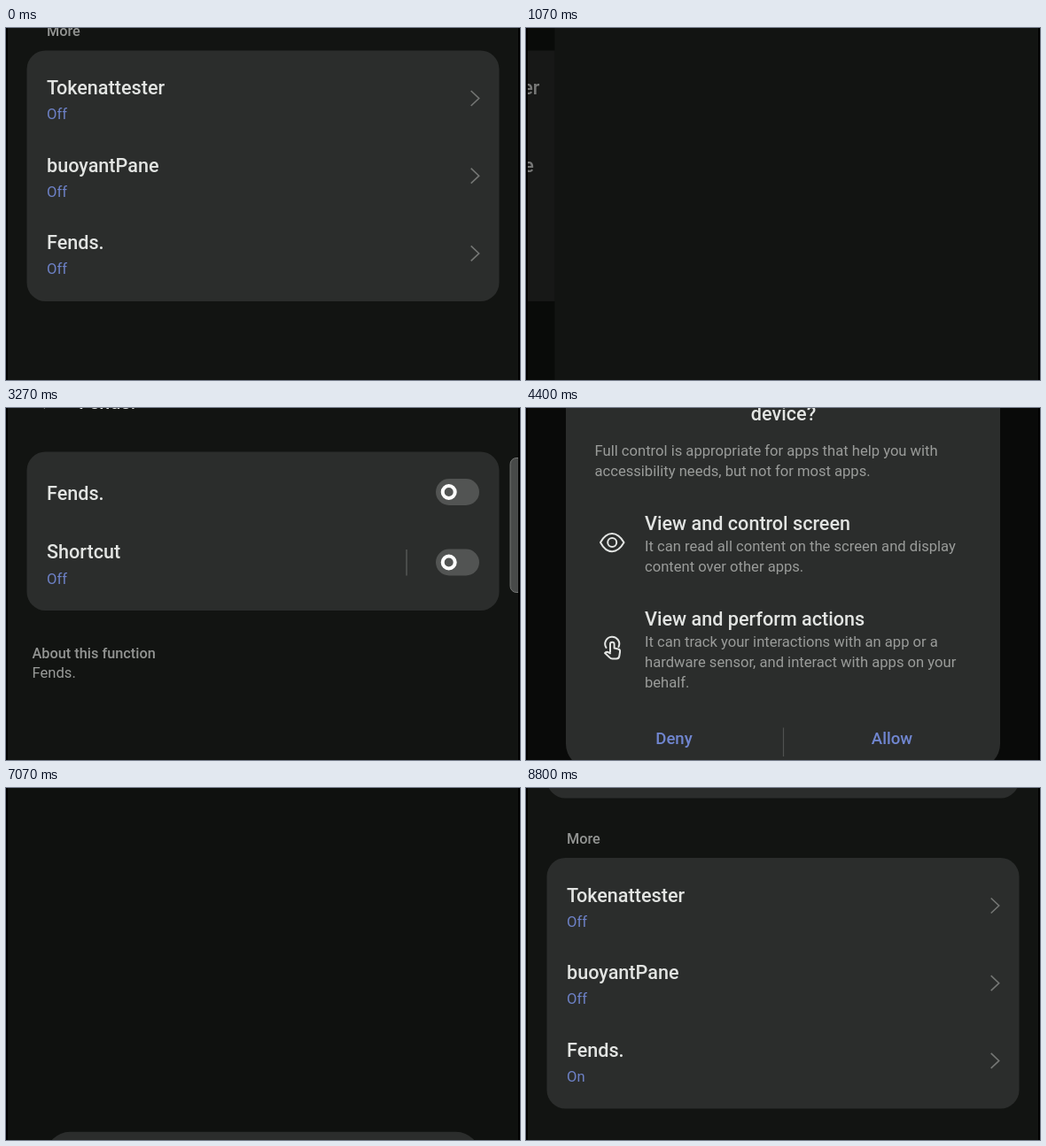
An HTML page for the animation above (8.87 s loop, 580x398 px).

```html
<!DOCTYPE html>
<html lang="en">
<head>
<meta charset="utf-8">
<title>Accessibility settings</title>
<style>
  html, body { margin: 0; width: 100%; height: 100%; overflow: hidden; background: #000; }
  svg { display: block; width: 100%; height: 100%; }
  text { font-family: Roboto, sans-serif; font-size: 16.6px; fill: #9a9c9a; }
  .title { font-size: 21.6px; font-weight: 500; fill: #e2e4e2; }
  .small { font-size: 16.3px; font-weight: 500; fill: #929492; }
  .state { fill: #6d81c6; }
  .button { font-size: 18.6px; font-weight: 500; fill: #7086d0; }
  .middle { text-anchor: middle; }
  .card { fill: #2b2d2c; }
  .ground { fill: #121412; }
  .icon { fill: none; stroke: #e2e4e2; stroke-width: 2; stroke-linecap: round; stroke-linejoin: round; }
</style>
</head>
<body>
<svg viewBox="0 0 580 398">
  <defs>
    <clipPath id="screen"><rect x="2" width="576" height="398"/></clipPath>
    <clipPath id="cardShape"><rect x="23.5" y="49.5" width="533" height="179.5" rx="21"/></clipPath>
    <path id="chevron" d="M524.7 71 L533.7 79.5 L524.7 88" fill="none" stroke="#747674" stroke-width="1.6"/>
    <g id="toggle">
      <rect x="485" y="-15" width="49" height="30" rx="15" fill="#525453"/>
      <circle cx="499.7" r="7" fill="none" stroke="#fff" stroke-width="4"/>
    </g>
  </defs>
  <rect width="580" height="398"/>
  <g clip-path="url(#screen)">
    <g id="list">
      <rect class="ground" width="780" height="398"/>
      <g id="scroller">
        <rect class="card" x="23.5" y="-142" width="533" height="100" rx="21"/>
        <text class="small" x="46" y="9">More</text>
        <rect class="card" x="23.5" y="25.5" width="533" height="283.5" rx="21"/>
        <text class="title" x="46" y="75">Tokenattester</text>
        <text class="state" x="46" y="103">Off</text>
        <use href="#chevron"/>
        <text class="title" x="46" y="162.7">buoyantPane</text>
        <text class="state" x="46" y="190.7">Off</text>
        <use href="#chevron" y="87.7"/>
        <text class="title" x="46" y="250.4">Fends.</text>
        <text class="state" id="status" x="46" y="278.4">Off</text>
        <use href="#chevron" y="175.4"/>
      </g>
    </g>
    <rect id="listShade" width="580" height="398"/>

    <g id="page">
      <rect class="ground" x="2" width="576" height="398"/>
      <g id="content">
        <path d="M44 -18 L35 -9 L44 0" fill="none" stroke="#e2e4e2" stroke-width="2"/>
        <text class="title" x="82" y="1">Fends.</text>
        <g clip-path="url(#cardShape)">
          <rect class="card" x="23" y="49" width="534" height="181"/>
          <rect id="press" x="23" y="49" width="534" height="82" fill="#353736"/>
        </g>
        <text class="title" x="46" y="103.5">Fends.</text>
        <use href="#toggle" y="95"/>
        <text class="title" x="46" y="170">Shortcut</text>
        <text class="state" x="46" y="198.5">Off</text>
        <path d="M452 160 V189.5" stroke="#555755" stroke-width="1.5"/>
        <use href="#toggle" y="174.5"/>
        <text class="small" x="29.5" y="283">About this function</text>
        <text x="29.5" y="305">Fends.</text>
        <rect x="569" y="56.5" width="24" height="152" rx="7" fill="#484a49" stroke="#747674"/>
      </g>
      <rect id="shade" x="2" width="576" height="398"/>
      <g id="dialog">
        <rect class="card" x="45" y="-80" width="490" height="487" rx="27"/>
        <text class="title middle" x="290.5" y="13.5">device?</text>
        <text x="77.5" y="54">Full control is appropriate for apps that help you with</text>
        <text x="77.5" y="77">accessibility needs, but not for most apps.</text>
        <g class="icon">
          <path d="M84 152 C91 138.5 103 138.5 110.5 152 C103 165.5 91 165.5 84 152 Z"/>
          <circle cx="97.2" cy="152" r="5"/>
          <path d="M90.5 271 A8 8 0 1 1 104.5 270"/>
          <path d="M95 276 V267 A2.3 2.3 0 0 1 99.600 267 V271.500 L104 272.500 Q106.500 273 106 276 L105.300 280.500 Q104.800 283.500 102 283.500 H97.500 Q95.500 283.500 94.300 282 L89 277 Q91 274.500 95 277.500"/>
        </g>
        <text class="title" x="134" y="138">View and control screen</text>
        <text x="134" y="162">It can read all content on the screen and display</text>
        <text x="134" y="185">content over other apps.</text>
        <text class="title" x="134" y="246">View and perform actions</text>
        <text x="134" y="270">It can track your interactions with an app or a</text>
        <text x="134" y="293">hardware sensor, and interact with apps on your</text>
        <text x="134" y="316">behalf.</text>
        <text class="button middle" x="167" y="380">Deny</text>
        <path d="M290.5 361.5 V394" stroke="#505250" stroke-width="1.2"/>
        <text class="button middle" x="413" y="380">Allow</text>
      </g>
    </g>
  </g>
</svg>
<script>
  const LOOP = 8870, TICK = LOOP / 133, WIDTH = 576;
  const el = id => document.getElementById(id);
  const [list, scroller, status, listShade, page, content, press, shade, dialog] =
    ['list', 'scroller', 'status', 'listShade', 'page', 'content', 'press', 'shade', 'dialog'].map(el);

  const ramp = (t, from, to) => Math.min(1, Math.max(0, (t - from) / (to - from)));
  const easeInOut = p => (1 - Math.cos(Math.PI * p)) / 2;
  const easeOut = p => 1 - (1 - p) ** 3;
  const move = (node, x, y) => node.setAttribute('transform', `translate(${x.toFixed(2)} ${y.toFixed(2)})`);
  const fade = (node, opacity) => {
    node.style.opacity = opacity;
    node.style.display = opacity > 0 ? '' : 'none';
  };

  function render(t) {
    // The opened page covers the list, which trails it at a slower rate.
    const cover = easeInOut(ramp(t, 645, 1140)) - easeInOut(ramp(t, 7850, 8270));
    move(page, WIDTH * (1 - cover), 0);
    move(list, -0.3 * WIDTH * cover, 0);
    fade(listShade, 0.5 * cover);
    move(scroller, 0, 53.5 * easeOut(ramp(t, 8250, 8735)));
    status.textContent = t > 4000 ? 'On' : 'Off';

    fade(content, t < 1130 ? 0 : 1 - ramp(t, 3540, 3740));
    fade(press, t < 2730 ? 0 : 1 - ramp(t, 2740, 3268));

    const leave = ramp(t, 6936, 7136);
    fade(shade, 0.5 * (ramp(t, 3560, 3800) - leave));
    move(dialog, 0, 490 * (1 - easeOut(ramp(t, 3600, 4000))) + 1055 * leave ** 2);
  }

  const start = performance.now();
  function play() {
    const t = (performance.now() - start) % LOOP;
    render(Math.floor((t + 4) / TICK) * TICK);
    requestAnimationFrame(play);
  }
  play();
</script>
</body>
</html>
```
